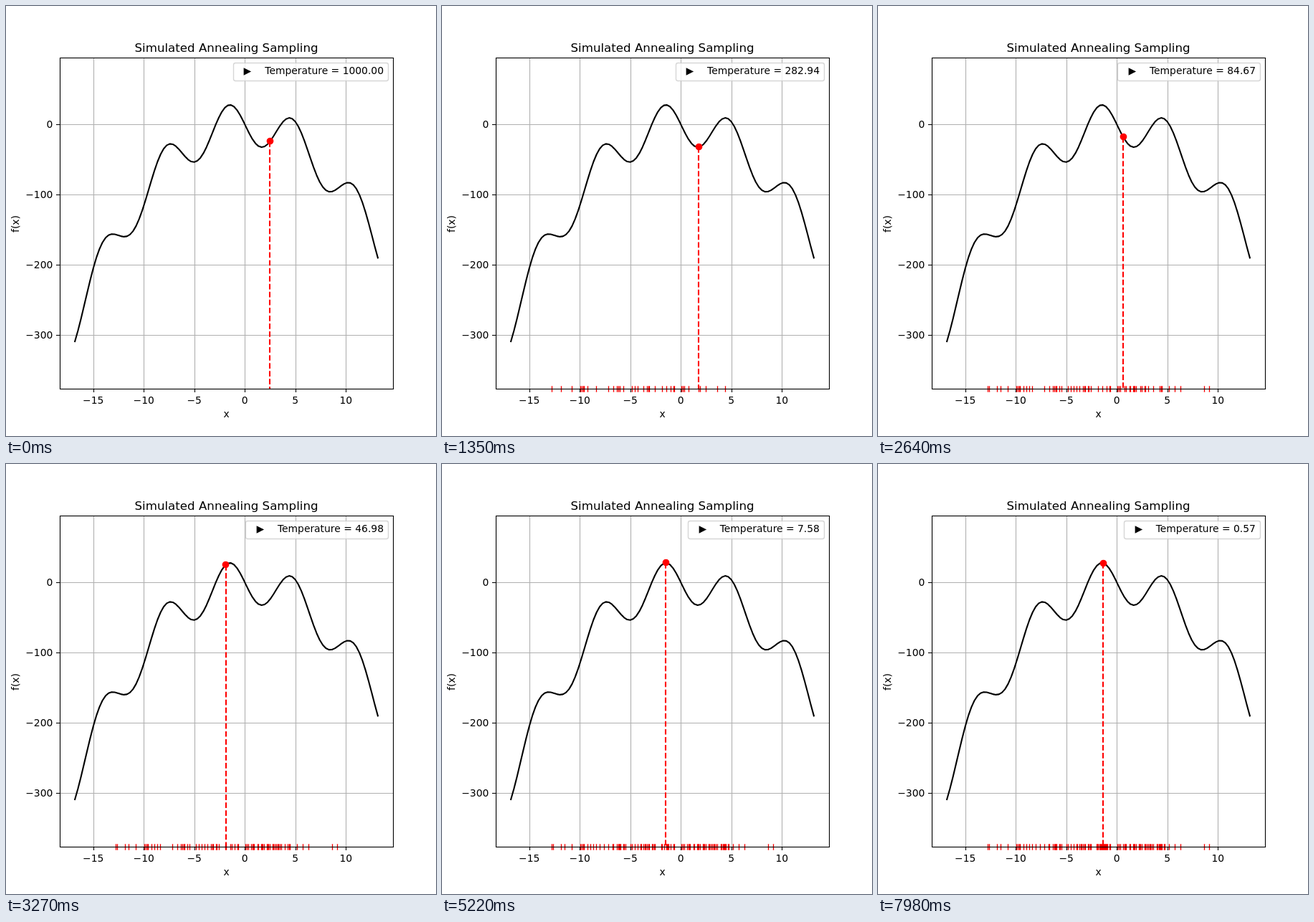
Animation, 600 px wide and 600 px high, one loop 8000 ms. Source, as an HTML page with a canvas:

```html
<!DOCTYPE html>
<html lang="en">
<head>
<meta charset="utf-8">
<title>Simulated Annealing Sampling</title>
<style>
html, body { margin: 0; width: 100%; height: 100%; overflow: hidden; background: #fff; }
canvas { display: block; }
</style>
</head>
<body>
<canvas id="stage" width="600" height="600"></canvas>
<script>
const ctx = document.getElementById('stage').getContext('2d');
const LOOP = 8000, STEP = 30, FRAMES = 267;
const LEFT = 75.5, RIGHT = 540.5, TOP = 72.5, BOTTOM = 534.5;
const X_MIN = -16.81, X_MAX = 13.165;
const PT = 100 / 72;

const f = x => -x * x - 30 * Math.sin(x);
const toX = x => 96.14 + 422.73 * (x - X_MIN) / (X_MAX - X_MIN);
const toY = y => 165.1 - 0.9792 * y;
const snap = v => Math.round(v) + 0.5;
const pixelCentre = v => Math.floor(v) + 0.5;

// Turning points of the walk: step, x, and the random spread until the next one.
const turns = [
  { step: 0, x: 2.49, spread: 2.5 },
  { step: 17, x: -9.9, spread: 1.5 },
  { step: 26, x: 0.4, spread: 2 },
  { step: 32, x: -12.75, spread: 1.5 },
  { step: 42, x: 4.4, spread: 1 },
  { step: 45, x: 1.78, spread: 2 },
  { step: 52, x: 9.15, spread: 1.5 },
  { step: 66, x: -12.6, spread: 2 },
  { step: 76, x: 6.3, spread: 2 },
  { step: 88, x: 0.63, spread: 2.5 },
  { step: 100, x: 4.5, spread: 2 },
  { step: 113, x: -8, spread: 1.5 },
  { step: 132, x: -2.63, spread: 0.5 },
  { step: 136, x: 4.5, spread: 0.4 },
  { step: 165, x: 4.4, spread: 0 },
  { step: 166, x: -1.2, spread: 0.5 },
  { step: 174, x: -1.49, spread: 0.55 },
  { step: 211, x: -1.28, spread: 0.3 },
  { step: 266, x: -1.36, spread: 0 }
];

function seededRandom(seed) {
  return () => (seed = seed * 16807 % 2147483647) / 2147483647;
}

// Proposals scatter around the path; rejections grow more common as it cools.
function walk() {
  const random = seededRandom(2024), path = [];
  for (let n = 0, i = 0; n < FRAMES; n++) {
    if (i < turns.length - 2 && n >= turns[i + 1].step) i++;
    const a = turns[i], b = turns[i + 1];
    const u = (n - a.step) / (b.step - a.step);
    const atTurn = u === 0 || u === 1;
    const jitter = atTurn ? 0 : a.spread * (2 * random() - 1);
    const accepted = atTurn || random() < 0.9 - n / 450;
    path.push(accepted ? a.x + (b.x - a.x) * u + jitter : path[n - 1]);
  }
  return path;
}
const samples = walk();

function line(points, color, width, dash = []) {
  ctx.beginPath();
  points.forEach(([x, y]) => ctx.lineTo(x, y));
  ctx.strokeStyle = color;
  ctx.lineWidth = width;
  ctx.setLineDash(dash);
  ctx.stroke();
  ctx.setLineDash([]);
}

function text(str, x, y, align = 'center', size = 10) {
  ctx.font = `${size * PT}px "DejaVu Sans", sans-serif`;
  ctx.textAlign = align;
  ctx.fillStyle = '#000';
  ctx.fillText(str, x, y);
}

const xTicks = [-15, -10, -5, 0, 5, 10], yTicks = [0, -100, -200, -300];
const label = v => String(v).replace('-', '\u2212');
const curve = Array.from({ length: 100 }, (_, i) => {
  const x = X_MIN + (X_MAX - X_MIN) * i / 99;
  return [toX(x), toY(f(x))];
});

function drawPlot() {
  ctx.fillStyle = '#fff';
  ctx.fillRect(0, 0, 600, 600);
  for (const v of xTicks) {
    const x = snap(toX(v));
    line([[x, TOP], [x, BOTTOM]], '#b0b0b0', 0.8 * PT);
    text(label(v), toX(v), 555);
  }
  for (const v of yTicks) {
    const y = snap(toY(v));
    line([[LEFT, y], [RIGHT, y]], '#b0b0b0', 0.8 * PT);
    text(label(v), 65.3, y + 4.7, 'right');
  }
  ctx.lineJoin = 'round';
  ctx.lineCap = 'square';
  line(curve, '#000', 1.5 * PT);
  ctx.lineJoin = 'miter';
  ctx.lineCap = 'butt';

  text('Simulated Annealing Sampling', 307.5, 64, 'center', 12);
  text('x', 307.5, 574);
  ctx.save();
  ctx.translate(18, 304);
  ctx.rotate(-Math.PI / 2);
  text('f(x)', 0, 0);
  ctx.restore();
}

function drawSamples(n) {
  const x = toX(samples[n]), y = toY(f(samples[n]));
  const stem = Math.round(x);
  line([[stem, Math.round(y)], [stem, 534]], '#f00', 1.5 * PT, [5.55 * PT, 2.4 * PT]);
  const marks = new Set(samples.slice(0, n).map(s => pixelCentre(toX(s))));
  for (const m of marks) line([[m, 530.3], [m, 538.7]], '#f00', PT);
  ctx.beginPath();
  ctx.arc(pixelCentre(x), pixelCentre(y), 3.5 * PT, 0, 2 * Math.PI);
  ctx.fillStyle = '#f00';
  ctx.fill();
}

function drawFrame() {
  for (const v of xTicks) {
    const x = snap(toX(v));
    line([[x, 534], [x, 539]], '#000', 0.8 * PT);
  }
  for (const v of yTicks) {
    const y = snap(toY(v));
    line([[70, y], [75, y]], '#000', 0.8 * PT);
  }
  ctx.strokeStyle = '#000';
  ctx.lineWidth = 0.8 * PT;
  ctx.strokeRect(LEFT, TOP, RIGHT - LEFT, BOTTOM - TOP);
}

function drawLegend(n) {
  const value = (1000 * Math.exp(-0.0280563 * n)).toFixed(2);
  const shift = 8.8 * (7 - value.length);
  const left = pixelCentre(317.2 + shift);
  ctx.beginPath();
  ctx.roundRect(left, 79.5, 533.5 - left, 25, 2.78);
  ctx.fillStyle = 'rgba(255,255,255,.8)';
  ctx.fill();
  ctx.strokeStyle = 'rgba(204,204,204,.8)';
  ctx.lineWidth = PT;
  ctx.stroke();

  const cx = pixelCentre(336.7 + shift), cy = 91.5, r = 3 * PT;
  ctx.beginPath();
  ctx.moveTo(cx + r, cy);
  ctx.lineTo(cx - r, cy + r);
  ctx.lineTo(cx - r, cy - r);
  ctx.closePath();
  ctx.fillStyle = ctx.strokeStyle = '#000';
  ctx.fill();
  ctx.stroke();
  text('Temperature = ' + value, 361.3 + shift, 95, 'left');
}

function draw() {
  const n = Math.floor(performance.now() % LOOP / STEP);
  drawPlot();
  drawSamples(n);
  drawFrame();
  drawLegend(n);
  requestAnimationFrame(draw);
}
draw();
</script>
</body>
</html>
```
